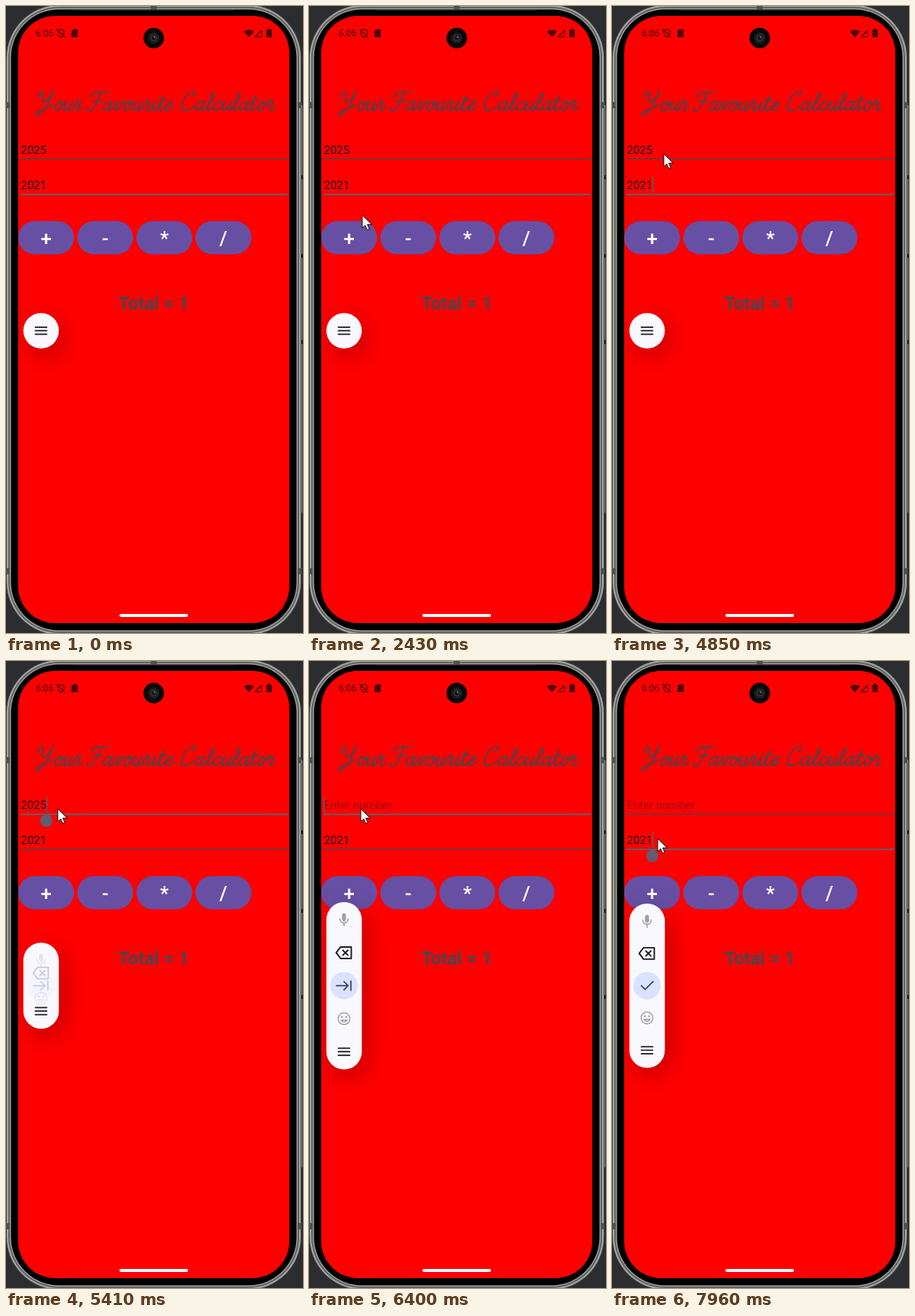
An HTML page with a canvas for the animation above (8000 ms loop, 390 by 822 pixels).

```html
<!DOCTYPE html>
<html lang="en">
<head>
<meta charset="utf-8">
<title>Calculator</title>
<style>
html, body { margin: 0; width: 100%; height: 100%; overflow: hidden; background: #2b2d30; }
canvas { display: block; }
h1 { position: absolute; left: 40px; top: 108px; margin: 0; font: italic 26px "Noto Serif", serif; white-space: nowrap; color: transparent; }
</style>
</head>
<body>
<canvas id="stage" width="390" height="822"></canvas>
<h1>Your Favourite Calculator</h1>
<script>
const LOOP = 8000;
const ctx = document.getElementById('stage').getContext('2d');
const INK = '#4a464e', DARK = '#1d1b20', STATUS = '#480a0c';
const FONT = 'Roboto, sans-serif';

// Script lettering: [advance, pen path], upright, baseline at 0
const GLYPHS = {
  Y: [24, 'M0-18C-1-25 4-27 6-22C7-17 6-11 9-11C13-11 17-19 18-27C17-14 14 0 8 4C3 8 0 4 5 1C10-2 17-5 22-8'],
  F: [19, 'M1-18C0-23 4-25 9-24C14-23 17-23 20-26M12-24C11-14 9-3 5 0C2 2-1-1 0-4M4-12C9-14 12-13 16-13'],
  C: [19, 'M12-19C18-24 13-28 7-23C0-17-1 0 6 0C11 0 15-3 18-6'],
  o: [12, 'M6-12C1-12 0 0 5 0C10 0 11-11 6-12C7-8 10-8 13-10'],
  u: [14, 'M0-7L3-12C1-5 1 0 4 0C7 0 9-5 11-12C9-4 9 0 11 0C13 0 14-2 15-5'],
  r: [12, 'M0-6C2-9 3-12 3-14C4-10 7-11 8-11C6-7 5 0 7 0C9 0 10-2 12-5'],
  a: [15, 'M11-10C8-14 1-11 1-5C1 1 6 1 10-8L11-12C9-5 9 0 11 0C13 0 14-2 15-5'],
  v: [12, 'M0-7C2-13 4-12 4-8L4 0C7-2 10-7 9-12C10-10 11-10 13-11'],
  i: [8, 'M0-5L3-12C1-4 1 0 4 0C6 0 7-2 9-5M4-17L4.4-17.2'],
  t: [9, 'M0-5L4-20C1-6 2 0 4 0C6 0 8-2 9-5M0-13L8-14'],
  e: [11, 'M1-5C5-6 9-8 8-11C6-14 1-9 1-5C1 1 7 1 11-5'],
  l: [9, 'M0-5C5-9 8-17 6-22C3-26 2-12 2-5C2 1 6 1 9-5'],
  c: [11, 'M9-10C8-14 1-12 1-5C1 1 7 1 11-5']
};
for (const key in GLYPHS) GLYPHS[key][1] = new Path2D(GLYPHS[key][1]);

// Pointer keys: time, x, y
const POINTER = [
  [440, 338, 803], [500, 267, 738], [560, 223, 704], [700, 160, 610], [900, 88, 480], [1120, 59, 426],
  [2180, 59, 426], [2330, 72, 350], [2480, 69, 238], [2590, 58, 201],
  [3000, 58, 201], [3120, 55, 199], [4480, 55, 199], [4850, 68, 194],
  [7110, 68, 194], [7260, 67, 206], [7440, 60, 233]
];
const ARROW = new Path2D('M0 0V16.5L3.8 13L6.5 19L9.3 17.8L6.6 12H12Z');

function box(x, y, w, h, r, fill) {
  ctx.beginPath();
  ctx.roundRect(x, y, w, h, r);
  ctx.fillStyle = fill;
  ctx.fill();
}

function disc(x, y, r, fill) {
  ctx.beginPath();
  ctx.arc(x, y, r, 0, Math.PI * 2);
  ctx.fillStyle = fill;
  ctx.fill();
}

function pen(path, color, width = 1.8) {
  ctx.strokeStyle = color;
  ctx.lineWidth = width;
  ctx.stroke(new Path2D(path));
}

function shape(path, fill) {
  ctx.fillStyle = fill;
  ctx.fill(new Path2D(path));
}

function label(text, x, y, font, fill, align = 'left') {
  ctx.font = font + ' ' + FONT;
  ctx.fillStyle = fill;
  ctx.textAlign = align;
  ctx.fillText(text, x, y);
}

function at(x, y, draw) {
  ctx.save();
  ctx.translate(x, y);
  draw();
  ctx.restore();
}

function drawPhone() {
  ctx.fillStyle = '#2b2d30';
  ctx.fillRect(0, 0, 390, 822);
  ctx.fillStyle = '#8f9190';
  ctx.fillRect(384, 130, 5, 534);
  box(0, -2, 388, 827, 70, '#3b3d3d');
  box(1, -1, 386, 825, 69, '#a5a7a4');
  box(3, 1, 382, 821, 67, '#626463');
  box(5, 3, 378, 817, 65, '#a0a29f');
  box(6.5, 4.5, 375, 814, 63, '#000');
  ctx.fillStyle = '#505252';
  for (const y of [126, 737]) {
    ctx.fillRect(0, y, 5, 8);
    ctx.fillRect(383, y, 5, 8);
  }
  ctx.fillRect(190, 0, 8, 4);
  ctx.fillStyle = '#222';
  ctx.fillRect(88, 5, 212, 1);
  for (const y of [222, 325, 438]) ctx.fillRect(388, y, 2, 5);
  box(16, 13, 356, 796, 48, '#f00');
}

function drawStatus() {
  label('6:06', 39, 40, '12px', STATUS);
  pen('M72 30.5L76 32V36C76 38.5 74 40 72 41C70 40 68 38.5 68 36V32ZM67 30.5L77 41', STATUS, 1.2);
  shape('M88.5 30.5H94V41H86V33Z', STATUS);
  shape('M312.5 33.5Q319 28.5 325.5 33.5L319 41Z', STATUS);
  pen('M327 40.5H335.5V32Z', STATUS, 1.1);
  box(342, 31, 7, 10, 1, STATUS);
  box(344, 29.7, 3, 2, 0, STATUS);
  disc(194, 42, 13.5, '#080808');
  disc(194, 42, 7.5, '#1c1c1e');
  disc(194, 42, 4.5, '#303033');
  disc(194, 42, 2.5, '#121214');
  disc(195, 41, 1, '#77777a');
}

function drawScript(word, x) {
  for (const letter of word) {
    const [advance, path] = GLYPHS[letter];
    ctx.save();
    ctx.transform(1, 0, -0.25, 1, x, 137);
    for (const nib of [-0.4, 0, 0.4]) {
      ctx.translate(nib, -nib);
      ctx.stroke(path);
    }
    ctx.restore();
    x += advance;
  }
}

function drawTitle() {
  ctx.strokeStyle = INK;
  ctx.lineWidth = 1.3;
  drawScript('Your', 38);
  drawScript('Favourite', 107);
  drawScript('Calculator', 228);
}

function drawField(text, base, focused, caret, handle) {
  const shown = text || 'Enter number';
  label(shown, 19.5, base, '15px', text ? DARK : 'rgba(29,27,32,.42)');
  ctx.fillStyle = focused ? '#665c66' : INK;
  ctx.fillRect(19, base + 6, 351, focused ? 2 : 1.3);
  const x = 19.5 + (text ? ctx.measureText(text).width : 0);
  if (caret) {
    ctx.fillStyle = '#625b66';
    ctx.fillRect(x - 0.5, base - 16, 1.5, 21);
  }
  if (handle) {
    disc(53, base + 15.5, 8, '#625b71');
    shape(`M53 ${base + 6}L59 ${base + 11}H47Z`, '#625b71');
  }
}

function drawButtons() {
  [...'+-*/'].forEach((sign, i) => {
    const x = 16 + i * 77.6;
    box(x, 282, 73.4, 43.5, 21.75, '#6750a4');
    label(sign, x + 36.7, 314, '500 26px', '#fff', 'center');
  });
  label('Total = 1', 194, 398, 'bold 24px', INK, 'center');
}

const ICONS = [
  () => {
    box(-2.6, -8.5, 5.2, 10.5, 2.6, '#a09fa6');
    pen('M-5.5-1.5C-5.5 6 5.5 6 5.5-1.5M0 4V8', '#a09fa6', 1.6);
  },
  () => pen('M-10.3 0L-4.5-7.5H9.5V7.5H-4.5ZM-1.5-3.2L5 3.2M5-3.2L-1.5 3.2', DARK, 1.9),
  check => {
    disc(0, 0, 18, '#dae2ff');
    pen(check ? 'M-7.5 0L-2.5 5L8-5.5' : 'M-10 0H5M0-5.3L5.3 0L0 5.3M9-6V6', '#3c4678', 1.8);
  },
  () => {
    pen('M7.7 0A7.7 7.7 0 1 1-7.7 0A7.7 7.7 0 1 1 7.7 0M-4 1.8Q0 7 4 1.8Z', '#a09fa6', 1.5);
    disc(-2.8, -2.3, 1.3, '#a09fa6');
    disc(2.8, -2.3, 1.3, '#a09fa6');
  },
  () => pen('M-7.5-4.6H7.5M-7.5 0H7.5M-7.5 4.6H7.5', DARK, 1.7)
];

function growth(t) {
  const start = t < 7557 ? 5327 : 7557;
  const p = Math.min(1, Math.max(0, (t - start) / 563));
  return 1 - (1 - p) ** 3;
}

function drawToolbar(t) {
  const open = growth(t);
  const height = 46.5 + 173 * open;
  const top = 425.7 - height / 2;
  ctx.save();
  ctx.beginPath();
  ctx.roundRect(16, 13, 356, 796, 48);
  ctx.clip();
  ctx.shadowColor = 'rgba(0,0,0,.26)';
  ctx.shadowBlur = 32;
  ctx.shadowOffsetX = 6;
  ctx.shadowOffsetY = 9;
  box(22.8, top, 46.6, height, 23.25, '#faf8ff');
  ctx.shadowColor = 'transparent';
  ctx.beginPath();
  ctx.roundRect(22.8, top, 46.6, height, 23.25);
  ctx.clip();
  ICONS.forEach((icon, i) => {
    ctx.globalAlpha = i === 4 ? 1 : Math.min(1, Math.max(0, open * 1.6 - 0.4));
    at(46, 425.7 + (i - 2) * 43.25 * open, () => icon(t >= 7557));
  });
  ctx.restore();
}

function drawPointer(t) {
  if (t < POINTER[0][0]) return;
  const next = POINTER.findIndex(key => key[0] > t);
  const b = POINTER[next < 0 ? POINTER.length - 1 : next];
  const a = next < 0 ? b : POINTER[next - 1];
  const p = a === b ? 1 : (t - a[0]) / (b[0] - a[0]);
  at(a[1] + (b[1] - a[1]) * p, a[2] + (b[2] - a[2]) * p, () => {
    ctx.fillStyle = '#fff';
    ctx.fill(ARROW);
    ctx.strokeStyle = '#111';
    ctx.lineWidth = 1;
    ctx.stroke(ARROW);
  });
}

function render(t) {
  const first = t >= 5270 && t < 7500;
  const blink = t < 4480 ? t >= 470 && (t - 470) % 1000 < 510 : t < 5100 || t >= 7500;
  const caret = t < 5770 || (t >= 5940 && t < 6910) || t >= 7410;
  const erased = [5960, 6120, 6300, 6400].filter(time => t >= time).length;

  drawPhone();
  drawStatus();
  drawTitle();
  drawField('2025'.slice(0, 4 - erased), 194, first, first && caret, first && t < 5940);
  drawField('2021', 240, !first, !first && blink, t >= 7600);
  drawButtons();
  drawToolbar(t);
  box(149, 797, 90, 4, 2, '#fff');
  drawPointer(t);
}

ctx.lineCap = 'round';
ctx.lineJoin = 'round';
const begin = performance.now();
function tick() {
  render((performance.now() - begin) % LOOP);
  requestAnimationFrame(tick);
}
tick();
</script>
</body>
</html>
```
